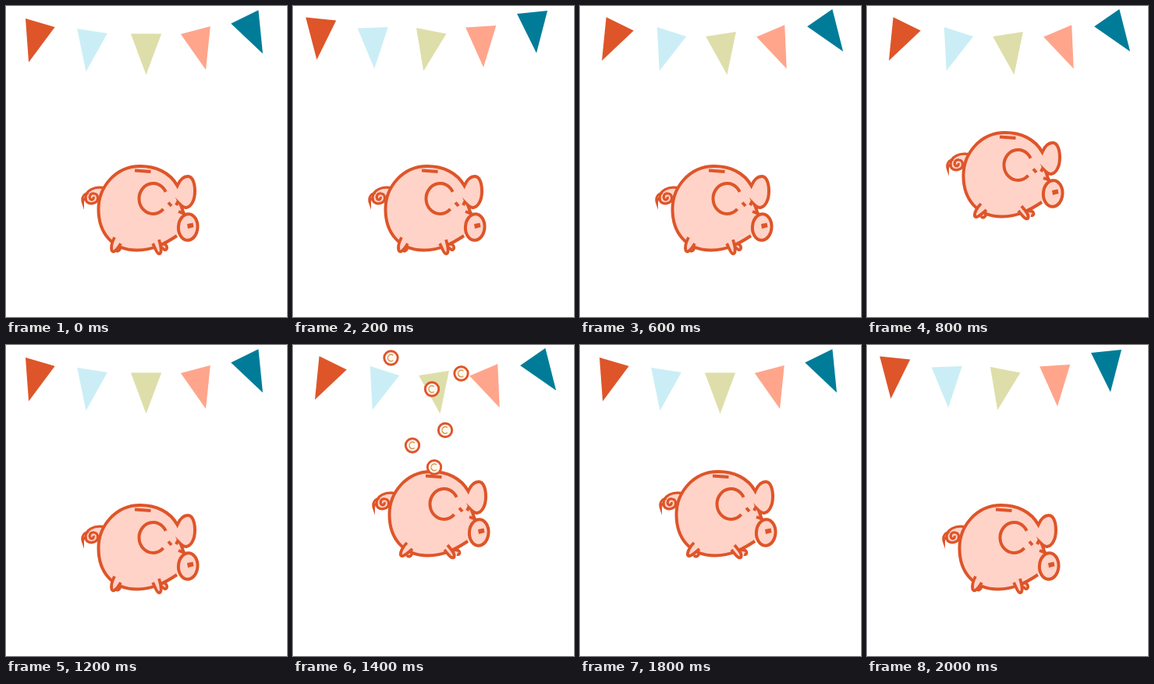
Write an HTML page with a canvas that moves like this. It is 360 by 398 pixels and loops after 2200 ms.

```html
<!DOCTYPE html>
<html lang="en">
<head>
<meta charset="utf-8">
<title>Piggy bank party</title>
<style>
html, body { margin: 0; width: 100%; height: 100%; overflow: hidden; background: #fff; }
canvas { display: block; width: 360px; height: 398px; }
</style>
</head>
<body>
<canvas id="stage"></canvas>
<script>
const W = 360, H = 398, STEP = 200;
const RED = '#de5529', SKIN = '#ffd3c8';

// One letter per step: flags swing left / middle / right, pig is up / down.
const FLAG_STEPS = 'MLMRRRMRMML';
const PIG_STEPS = 'DDUDUDDUDUD';

const FLAG_COLORS = [RED, '#cbeef6', '#dedeaa', '#ffa58c', '#007c99'];

// Middle of the top edge and tilt in degrees, for each flag.
const FLAGS = {
  L: [[35.8, 16.5, 5.8], [102.2, 27.8, -2.2], [177.2, 31.8, 11], [240.7, 26.2, -3.6], [306.5, 8, -5.9]],
  M: [[43.8, 21.5, 16.3], [110.5, 32, 8.8], [179.5, 35.5, 0], [242.8, 31, -14.6], [305.8, 13.8, -26.2]],
  R: [[51.2, 22.8, 26.2], [117.5, 33, 17.5], [180.5, 36, -8.7], [244.2, 31.8, -23], [307.2, 15.2, -34.7]]
};

const COINS = {
  7: [[125.5, 16.5], [215.5, 36.5], [178, 56.5], [195, 109], [153, 128.5], [181, 156.5]],
  8: [[145.5, 116], [204.5, 133.5], [177, 156]]
};

const path = d => new Path2D(d);

const BODY = path('M219 294C204 304 188 312.5 168 312.5C136 312.5 118.5 290 118.5 260' +
  'C118.5 232 140 205 172 205C192 205 210 213 219.5 230C223 222 227 218 233 218' +
  'C239 218 242 227 242 237C242 249 237 257 231 258C228 258.5 226 257 224 255' +
  'C226 259 226 262 228 266');
const TAIL_FILL = path('M127 233C113 230 102 236 102 246C102 252 108 254 113 252L123 245Z');
const TAIL = path('M127 233C113 230 102 236 102 246C102 252 108 254 113 252' +
  'C119 250 119 241 113 240C108 239 106 244 108 247C110 249 113 247 112 244' +
  'M122 243C119 244 119 250 113 252');
const TAIL_TIP = path('M106 239C100 240 96 245 98.5 252C98.5 249 99 247 103 245');
const MARKS = path('M165 210.5L185.5 212M221 263L229 266M208 251.5L212 256M220.5 250L218 255');
const NOSTRIL = path('M232 279L239.5 277.5L240.5 283L233 285Z');

const LEGS = {
  D: {
    back: path('M147 305L146 311C145 314 142 314 141 313M198 303L204 305C208 309 206 313 203 312L199 309'),
    front: path('M139 296C136 302 134 308 135.5 313C137 316 141 314 147 304' +
      'M188 304C191 309 193 317 196 317C200 317 199 309 196 299')
  },
  U: {
    back: path('M141 312C143 315 146 314 148 309M200 305L207 306C210 309 208 312 205 311'),
    front: path('M141 296C136 301 132 308 133 312C134 315 139 312 148 304' +
      'M189 305C193 310 198 317 201 315C204 311 198 305 193 299')
  }
};

const canvas = document.getElementById('stage');
const ctx = canvas.getContext('2d');
const dpr = window.devicePixelRatio || 1;
canvas.width = W * dpr;
canvas.height = H * dpr;

function paint(shape, width, fill = SKIN) {
  if (fill) {
    ctx.fillStyle = fill;
    ctx.fill(shape);
  }
  ctx.strokeStyle = RED;
  ctx.lineWidth = width;
  ctx.stroke(shape);
}

function arc(x, y, rx, ry, from = 0, to = 2 * Math.PI, tilt = 0) {
  const p = new Path2D();
  p.ellipse(x, y, rx, ry, tilt, from, to);
  return p;
}

const SNOUT = arc(233.2, 283, 12.3, 16.8, 0, 2 * Math.PI, 0.06);
const BIG_C = arc(188.5, 246.5, 18, 19.5, 0.76, 2 * Math.PI - 0.46);

function drawFlags(pose) {
  FLAGS[pose].forEach(([x, y, deg], i) => {
    ctx.save();
    ctx.translate(x, y);
    ctx.rotate(deg * Math.PI / 180);
    ctx.fillStyle = FLAG_COLORS[i];
    ctx.fill(path('M-19.6 0H19.6L0 52.5Z'));
    ctx.restore();
  });
}

function drawCoin(x, y) {
  paint(arc(x, y, 8.7, 8.7), 2.9, '#fff8ee');
  ctx.strokeStyle = '#cf8a4c';
  ctx.lineWidth = 1.2;
  ctx.stroke(arc(x, y, 4, 4.3, 0.8, 2 * Math.PI - 0.8));
}

function drawSinkingCoin() {
  ctx.save();
  ctx.beginPath();
  ctx.rect(160, 195, 30, 15.5);
  ctx.clip();
  drawCoin(175, 211.5);
  ctx.restore();
}

function drawPig(pose, sinking) {
  ctx.save();
  if (pose === 'U') ctx.translate(5, -43);
  ctx.fillStyle = SKIN;
  ctx.fill(TAIL_FILL);
  paint(TAIL, 3.2, null);
  paint(TAIL_TIP, 3, null);
  paint(LEGS[pose].back, 3.6);
  paint(BODY, 4);
  paint(LEGS[pose].front, 3.8);
  paint(SNOUT, 4);
  paint(BIG_C, 4, null);
  if (sinking) drawSinkingCoin();
  paint(MARKS, 4, null);
  ctx.fillStyle = RED;
  ctx.fill(NOSTRIL);
  ctx.restore();
}

function draw(step) {
  ctx.setTransform(dpr, 0, 0, dpr, 0, 0);
  ctx.fillStyle = '#fff';
  ctx.fillRect(0, 0, W, H);
  drawFlags(FLAG_STEPS[step]);
  drawPig(PIG_STEPS[step], step === 8);
  (COINS[step] || []).forEach(([x, y]) => drawCoin(x, y));
}

const start = performance.now();
function tick() {
  const elapsed = performance.now() - start;
  draw(Math.floor(elapsed / STEP) % FLAG_STEPS.length);
  requestAnimationFrame(tick);
}
tick();
</script>
</body>
</html>
```
